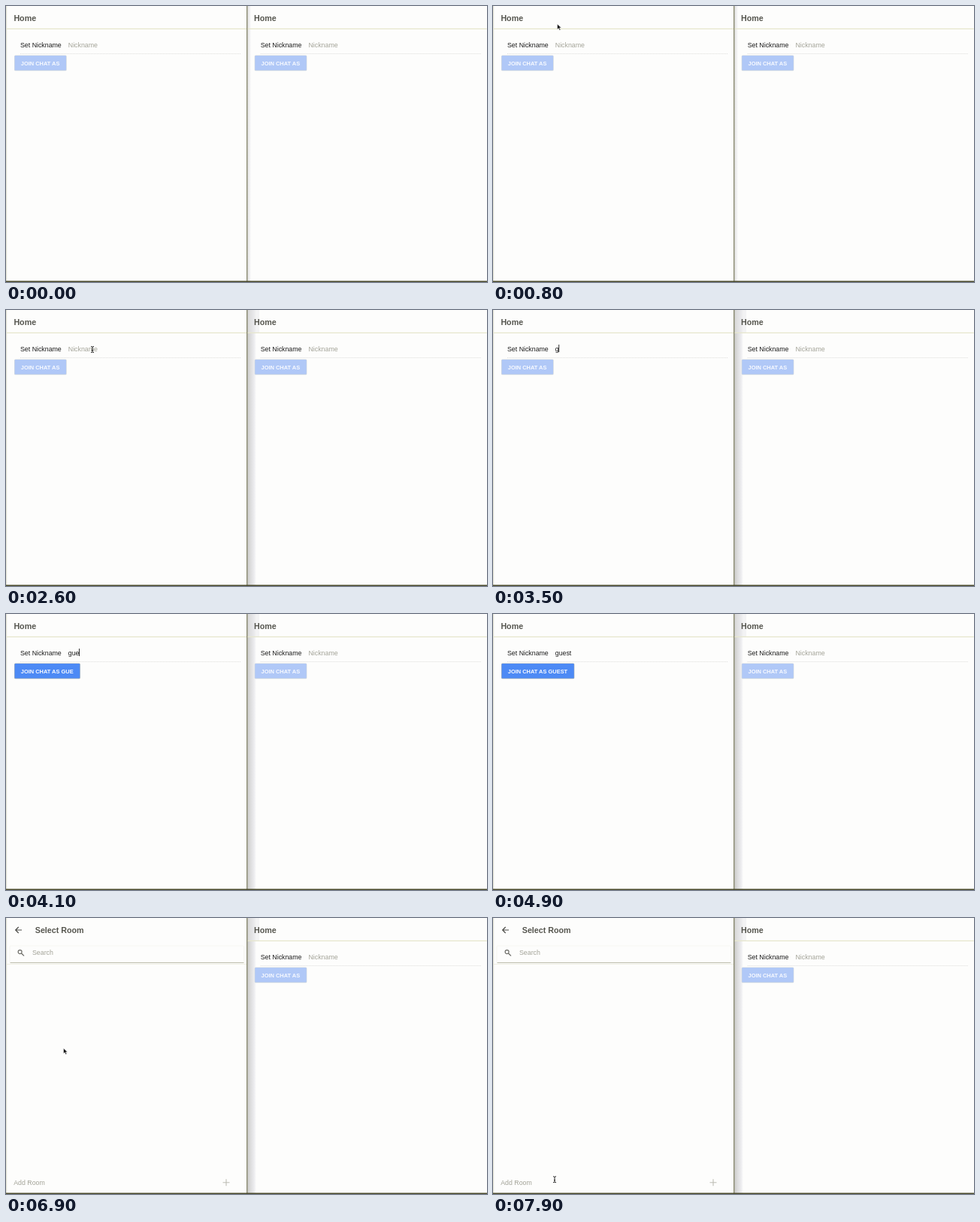
These frames come from a looping animation (640x367 px, 8000 ms). An HTML page:

```html
<!DOCTYPE html>
<html lang="en">
<head>
<meta charset="utf-8">
<title>Chat in two windows</title>
<style>
  html, body { margin: 0; width: 100%; height: 100%; overflow: hidden; background: #fdfdfc; }
  svg { display: block; width: 100%; height: 100%; }
  text { font: 8.8px "Liberation Sans", Arial, sans-serif; fill: #1c1c1c; white-space: pre; }
  .title { font-size: 10.7px; font-weight: bold; fill: #55554e; }
  .hint { fill: #a3a398; }
  .caps { font-size: 7.45px; font-weight: bold; fill: #f8faff; }
  .rule { stroke: #e6e6cc; stroke-width: 1.2; }
  .dots { stroke: #dededc; stroke-dasharray: 1 1; }
</style>
</head>
<body>
<svg viewBox="0 0 640 367" preserveAspectRatio="none">
  <defs>
    <linearGradient id="shade">
      <stop offset="0" stop-color="#c9c9c6"/>
      <stop offset=".35" stop-color="#dcdcdc"/>
      <stop offset=".75" stop-color="#ececef"/>
      <stop offset="1" stop-color="#fdfdfc"/>
    </linearGradient>
    <clipPath id="leftClip"><rect width="320" height="367"/></clipPath>
  </defs>
  <rect width="640" height="367" fill="#fdfdfc"/>

  <rect id="shadow" x="321" width="12" height="367" fill="url(#shade)"/>
  <rect id="corner" x="322" width="15" height="31" fill="#e4e4e6" opacity=".4"/>
  <g id="left"></g>
  <g id="right" transform="translate(319.7 0)"></g>

  <g clip-path="url(#leftClip)">
    <g id="room">
      <rect width="320" height="367" fill="#fdfdfc"/>
      <path d="M21 16H12.8M16.7 12L12.7 16L16.7 20" fill="none" stroke="#4c4c48" stroke-width="1.2"/>
      <text class="title" x="38.8" y="19.7">Select Room</text>
      <path d="M0 61.5H320" stroke="#f0f0e4"/>
      <rect x="5" y="37" width="311.5" height="22" rx="1" fill="#fdfdfc" stroke="#f4f4ee" stroke-width=".8"/>
      <path d="M5.5 59.5H316.5" stroke="#bdbdac"/>
      <circle cx="18.6" cy="45.1" r="2.5" fill="none" stroke="#686862" stroke-width="1.1"/>
      <path d="M20.5 47L24 50.4" stroke="#686862" stroke-width="1.2"/>
      <text class="hint" x="35" y="49.2">Search</text>
      <text class="hint" x="10.2" y="355">Add Room</text>
      <path d="M288.5 351.7H297.5M293 347.2V356.2" stroke="#bdbdb4" stroke-width="1.1"/>
    </g>
  </g>

  <path d="M.6 0V367" stroke="#e2e2d4" stroke-width="1.2"/>
  <path d="M320.7 0V367" stroke="#85856a" stroke-width="1.3"/>
  <path d="M0 366.3H640" stroke="#4a4a2c" stroke-width="1.4"/>

  <path id="arrow" d="M0 0V7.2L1.8 5.6L3 8.3L4.3 7.7L3.1 5.1H5.3Z" fill="#111" stroke="#fff" stroke-width=".5"/>
  <path id="beam" d="M-2 -4Q0 -4 0 -3Q0 -4 2 -4M0 -3V3M-2 4Q0 4 0 3Q0 4 2 4M-1 1H1" fill="none" stroke="#222" stroke-width="1"/>
</svg>
<script>
const $ = id => document.getElementById(id);
const LOOP = 8000, STEP = 100;
const FOCUS = 1700, PUSH = 5500, PUSH_TIME = 300;
const NAME = "guest", KEYS = [3500, 3800, 4000, 4200, 4400];

// Pointer path: time, x, y of the hot spot
const POINTER = [
  [600, 80, 3], [800, 85.5, 24], [1300, 115, 52.5], [3400, 115, 52.5],
  [5000, 115, 52.5], [5400, 73.5, 78.3], [6500, 73.5, 78.3], [7500, 82, 347.7]
];

function homePage(host) {
  host.innerHTML = `
    <text class="title" x="10.4" y="19.7">Home</text>
    <path class="rule" d="M1 30.4H320"/>
    <text x="19" y="54.6">Set Nickname</text>
    <text class="field" x="82.8" y="54.6"></text>
    <path class="dots" d="M19 63.5H312"/>
    <rect class="glow" x="11" y="65.5" height="20.8" rx="1.5"/>
    <rect class="button" x="11.6" y="66" height="19.4" rx="1"/>
    <text class="caps" x="19.8" y="78.5"></text>
    <path class="caret" d="M0 46V56" stroke="#333" stroke-width="1"/>`;
  const [field, glow, button, caps, caret] =
    ["field", "glow", "button", "caps", "caret"].map(c => host.querySelector("." + c));

  return (typed, label, caretOn) => {
    field.textContent = typed || "Nickname";
    field.classList.toggle("hint", !typed);
    caps.textContent = ("JOIN CHAT AS " + label.toUpperCase()).trim();
    const width = caps.getComputedTextLength() + 16.8;
    button.setAttribute("width", width);
    glow.setAttribute("width", width + 1.2);
    button.setAttribute("fill", label ? "#4d8af5" : "#b0c8f7");
    glow.setAttribute("fill", label ? "#a9b3b8" : "#d3d9dc");
    const x = 82.8 + (typed ? field.getComputedTextLength() : 0);
    caret.setAttribute("transform", `translate(${x} 0)`);
    show(caret, caretOn);
  };
}

const show = (el, on) => el.setAttribute("visibility", on ? "visible" : "hidden");
const typedAt = t => NAME.slice(0, KEYS.filter(k => k <= t).length);

function pointerAt(t) {
  const i = POINTER.findIndex(p => p[0] > t);
  if (i < 0) return POINTER[POINTER.length - 1].slice(1);
  if (i === 0) return POINTER[0].slice(1);
  const [t0, x0, y0] = POINTER[i - 1], [t1, x1, y1] = POINTER[i];
  const u = (t - t0) / (t1 - t0), e = u * u * (3 - 2 * u);
  return [x0 + (x1 - x0) * e, y0 + (y1 - y0) * e];
}

const drawLeft = homePage($("left")), drawRight = homePage($("right"));
drawRight("", "", false);

function draw(t) {
  const lastInput = Math.max(FOCUS, ...KEYS.filter(k => k <= t));
  const blinkOn = Math.floor((t - lastInput) / 500) % 2 === 0;
  drawLeft(typedAt(t), typedAt(t - STEP), t >= FOCUS && t < PUSH && blinkOn);

  const focused = t >= FOCUS;
  $("shadow").setAttribute("width", focused ? 12 : 5);
  $("shadow").setAttribute("opacity", focused ? 1 : 0.6);
  show($("corner"), focused);

  const pushed = Math.min(1, Math.max(0, (t - PUSH) / PUSH_TIME));
  const ease = 1 - (1 - pushed) ** 3;
  $("room").setAttribute("opacity", ease);
  $("room").setAttribute("transform", `translate(0 ${40 * (1 - ease)})`);

  const [x, y] = pointerAt(t);
  const visible = t >= 600 && (t < 3400 || t >= 5000);
  const overField = t < PUSH ? x > 81 && y > 44 && y < 62 : y > 340;
  for (const id of ["arrow", "beam"]) $(id).setAttribute("transform", `translate(${x} ${y})`);
  show($("arrow"), visible && !overField);
  show($("beam"), visible && overField);
}

function tick() {
  draw(Math.floor(performance.now() % LOOP / STEP) * STEP);
  requestAnimationFrame(tick);
}
tick();
</script>
</body>
</html>
```
